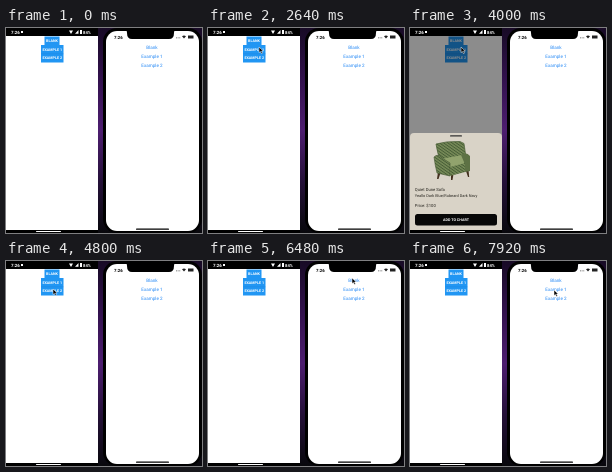
An HTML page that plays this animation: 196 by 205 pixels, repeating every 8 s.

```html
<!DOCTYPE html>
<html lang="en">
<head>
<meta charset="utf-8">
<title>Bottom sheets</title>
<style>
html, body { margin: 0; width: 100%; height: 100%; overflow: hidden; background: #000; }
svg { display: block; width: 196px; height: 205px; }
text { font-family: Roboto, Inter, sans-serif; text-rendering: geometricPrecision; }
.mid { text-anchor: middle; }
.btn { font-size: 3.7px; font-weight: 700; fill: #fff; }
.link { font: 4.6px Inter, sans-serif; fill: #2387f5; }
</style>
</head>
<body>
<svg viewBox="0 0 196 205">
  <defs>
    <linearGradient id="wall" x2="0" y2="1">
      <stop offset="0" stop-color="#170a25"/>
      <stop offset=".25" stop-color="#32114d"/>
      <stop offset=".5" stop-color="#4d1d70"/>
      <stop offset=".75" stop-color="#241038"/>
      <stop offset="1" stop-color="#08080c"/>
    </linearGradient>
    <linearGradient id="card" x2="1" y2="1">
      <stop offset="0" stop-color="#4aaee0"/>
      <stop offset="1" stop-color="#75c3e8"/>
    </linearGradient>
    <pattern id="weave" width="2.4" height="2.4" patternUnits="userSpaceOnUse" patternTransform="rotate(35)">
      <rect width="2.4" height="2.4" fill="#778b58"/>
      <path d="M0 .5H2.4" stroke="#3f5531" stroke-width=".8"/>
    </pattern>
    <clipPath id="left"><path d="M0 8H92V202H0Z"/></clipPath>
    <clipPath id="right"><rect x="100" y="3" width="93" height="200" rx="11"/></clipPath>
    <clipPath id="cardClip"><path d="M4 140H90V194q0 4 -4 4H8q-4 0 -4 -4Z"/></clipPath>
  </defs>

  <rect width="196" height="205" fill="url(#wall)"/>

  <!-- Android -->
  <path d="M0 0H92V205H0Z"/>
  <path d="M0 8H92V202H0Z" fill="#fff"/>
  <g fill="#fff">
    <text x="5" y="5.6" font-size="4.4" font-weight="700">7:26</text>
    <path d="M15 3h2v2h-2zM63 2.5h4l-2 3.5zM72.5 5.8V2L69 5.8zM74 2h2v4h-2z"/>
    <text x="77" y="5.7" font-size="4.2" font-weight="700">84%</text>
    <rect x="30" y="203" width="25" height="1" rx=".5"/>
  </g>
  <path d="M38.5 8.5h15V17H57.5V34.5H35V17h3.5z" fill="#2196f3"/>
  <path d="M35 25.8H57.5" stroke="#1c84d8" stroke-width=".4"/>
  <g class="btn mid">
    <text x="46" y="14.3">BLANK</text>
    <text x="46.2" y="22.5">EXAMPLE 1</text>
    <text x="46.2" y="31.4">EXAMPLE 2</text>
  </g>
  <g clip-path="url(#left)">
    <rect id="dimLeft" y="8" width="92" height="195"/>

    <g id="blank">
      <path d="M0 205V122q0 -4 4 -4H88q4 0 4 4V205Z" fill="#fff"/>
      <rect x="40" y="120" width="12" height="1.2" rx=".6" fill="#333"/>
    </g>

    <g id="shop">
      <path d="M0 205V109q0 -4 4 -4H88q4 0 4 4V205Z" fill="#d9d3c7"/>
      <rect x="40" y="107.3" width="12" height="1.2" rx=".6" fill="#333"/>
      <path d="M28 144l-1 7h1.5l2 -6zM41 146v6h1.5l1 -6zM56 143l2 6h1.2l-.7 -7z" fill="#44301f"/>
      <path d="M26 116q10 -3 24 -2.5l4 2 2 14 -24 6q-5 -10 -6 -19.5z" fill="url(#weave)" stroke="#485d35" stroke-width=".7"/>
      <path d="M31 131l21 -4 5 4v7l-17 5 -9 -3z" fill="#91a36d"/>
      <path d="M24 129q4 -4 8 1l8 5v13l-13 -3q-2 -8 -3 -16z" fill="url(#weave)" stroke="#40532f" stroke-width=".6"/>
      <path d="M51 127q5 -4 9 1v15l-5 1 -1 -10z" fill="#5d7144"/>
      <path d="M40 139l15 -4v9l-15 4z" fill="url(#weave)"/>
      <g fill="#27251f" font-size="4.2">
        <text x="4.8" y="163.2">Quiet Dune Sofa</text>
        <text x="4.8" y="169.2" font-size="3.9">Yeallo Dark Blue/Rubeard Dark Navy</text>
        <text x="4.8" y="178.6">Price: $100</text>
      </g>
      <rect x="5" y="186" width="82" height="11.5" rx="2.5" fill="#080808"/>
      <text class="btn mid" x="46" y="193.2">ADD TO CHART</text>
    </g>

    <g id="calm">
      <path d="M0 205V109q0 -4 4 -4H88q4 0 4 4V205Z" fill="#fff"/>
      <rect x="40" y="107.3" width="12" height="1.2" rx=".6" fill="#333"/>
      <g fill="#3f4247">
        <text x="4.6" y="117.4" font-size="6.7">Good Evening</text>
        <text x="4.6" y="127.2" font-size="6.2">Everyday is a good day</text>
        <text x="4.6" y="145.3" font-size="6.8">Recommend</text>
      </g>
      <rect x="4" y="154" width="86" height="44" rx="4" fill="url(#card)"/>
      <g clip-path="url(#cardClip)">
        <path d="M59 165q-3 -14 8 -17 12 -3 16 7 3 8 3 15l-9 7H64q-7 -4 -5 -12z" fill="#e96f70"/>
        <path d="M50 198q2 -15 14 -18l6 -3 8 3q11 3 13 18z" fill="#f7e9e5"/>
        <path d="M67 171h8v9q-4 4 -8 0z" fill="#f2ab94"/>
        <ellipse cx="70.5" cy="164.5" rx="7.5" ry="9" fill="#fbc6b0"/>
        <path d="M62 163q1 -12 10 -11 7 1 7 12 -2 -7 -8 -8 -5 5 -9 7z" fill="#dc5660"/>
        <path d="M65 164.5q1.7 1.5 3.2 0m4.3 0q1.6 1.5 3.2 0M68 169q2.5 2 5 0" fill="none" stroke="#984c4d" stroke-width=".7"/>
        <path d="M56 194q3 -9 12 -9l5 2 -3 5 -10 5zM86 194q-3 -9 -12 -9l-4 2 4 5 8 5z" fill="#f7b59f"/>
        <path d="M85 158q2 -4 4 -5v9q-2 1 -4 -4zM59 158l-5 -4 1 5z" fill="#f3a5a4"/>
      </g>
      <g fill="#fff">
        <text x="8.7" y="165" font-size="5.8" font-weight="700">Daily 10-minute</text>
        <text x="8.7" y="172.7" font-size="5.8" font-weight="700">meditation</text>
        <text x="8.7" y="179.5" font-size="3.3">10 minutes</text>
        <rect x="8.5" y="183.5" width="22" height="9.5" rx="4.75"/>
      </g>
      <path d="M13 186.5v3.5l3 -1.7z" fill="#55b3df"/>
      <text x="18" y="189.8" font-size="4.2" fill="#55b3df">Play</text>
    </g>
  </g>

  <!-- iPhone -->
  <rect x="97" y="0" width="99" height="205" rx="14"/>
  <rect x="100" y="3" width="93" height="200" rx="11" fill="#fff"/>
  <path d="M119 2q2 0 2 3 0 6 5 6H163q5 0 5 -6 0 -3 2 -3z"/>
  <text x="108" y="11.2" font-size="4.3" font-weight="700">7:26</text>
  <path d="M170 9.4h.8v.8h-.8zm1.7 0h.8v.8h-.8zm1.7 0h.8v.8h-.8zM176 8.3q2 -1.5 4 0l-2 2.2zM182 7.6h5.5v2.8H182z" fill="#222"/>
  <g class="link mid">
    <text x="146" y="20.7">Blank</text>
    <text x="146" y="29.7">Example 1</text>
    <text x="146" y="38.7">Example 2</text>
  </g>
  <g clip-path="url(#right)">
    <rect id="dimRight" x="100" width="93" height="205"/>
    <g id="iosBlank">
      <path d="M100 205V122q0 -4 4 -4H189q4 0 4 4V205Z" fill="#fff"/>
      <rect x="140" y="120" width="12" height="1.2" rx=".6" fill="#333"/>
    </g>
  </g>
  <rect x="130" y="200.6" width="33" height="1.2" rx=".6"/>

  <path id="cursor" d="M0 0V5.6L1.4 4.4 2.4 6.6 3.5 6.1 2.5 4H4.2Z" stroke="#fff" stroke-width=".5"/>
</svg>
<script>
const $ = id => document.getElementById(id);
const LOOP = 8000, STEP = 80, SLIDE = 320;

// id, opening time, closing time, travel, backdrop
const sheets = [
  ["blank", 1120, 2000, 87, "dimLeft"],
  ["shop", 2880, 4240, 100, "dimLeft"],
  ["calm", 4960, 5760, 100, "dimLeft"],
  ["iosBlank", 6640, 7280, 87, "dimRight"]
];

// time, x, y
const path = [
  [0, 200, 60], [160, 200, 60], [880, 49, 11], [2080, 49, 11],
  [2480, 51, 19], [4480, 51, 19], [4800, 47, 28], [6080, 47, 28],
  [6400, 144, 17], [7440, 144, 17], [7760, 144, 29], [8000, 144, 29]
];

const clamp = v => Math.min(1, Math.max(0, v));
const easeOut = v => 1 - (1 - clamp(v)) ** 3;
const smooth = v => v * v * (3 - 2 * v);

function draw(t) {
  const dim = { dimLeft: 0, dimRight: 0 };
  for (const [id, open, close, travel, back] of sheets) {
    const shown = easeOut((t - open) / SLIDE) - easeOut((t - close) / SLIDE);
    $(id).setAttribute("transform", `translate(0 ${travel * (1 - shown)})`);
    dim[back] = Math.max(dim[back], shown);
  }
  for (const id in dim) $(id).setAttribute("opacity", dim[id] * 0.45);

  const i = path.findIndex(p => p[0] > t);
  const [t0, x0, y0] = path[i - 1], [t1, x1, y1] = path[i];
  const k = smooth((t - t0) / (t1 - t0));
  $("cursor").setAttribute("transform", `translate(${x0 + (x1 - x0) * k} ${y0 + (y1 - y0) * k})`);
}

const start = performance.now();
function tick() {
  const t = (performance.now() - start) % LOOP;
  draw(Math.floor(t / STEP) * STEP);
  requestAnimationFrame(tick);
}
tick();
</script>
</body>
</html>
```
